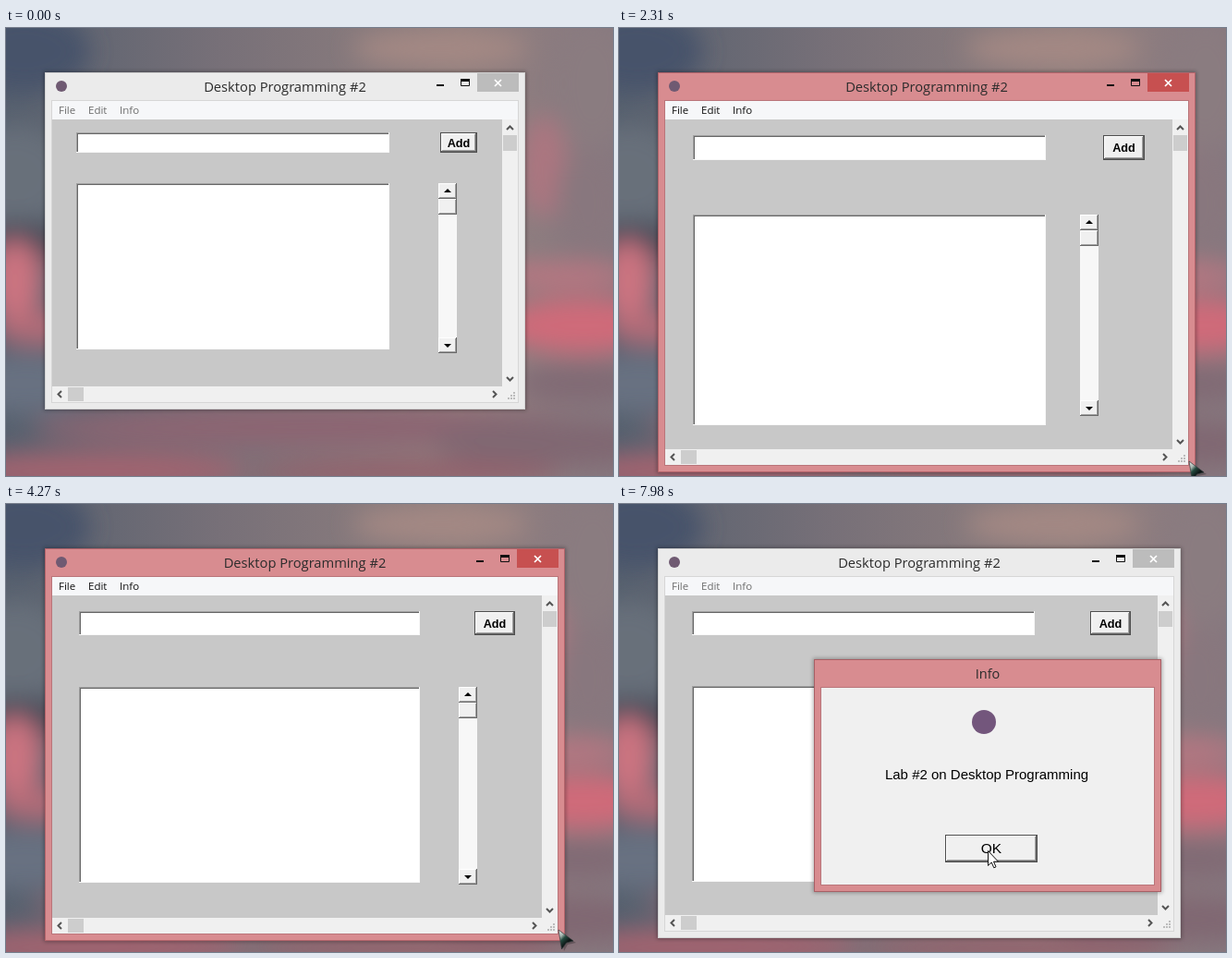
These frames come from a looping animation (657x485 px, 8000 ms). An HTML page:

```html
<!DOCTYPE html>
<html lang="en">
<head>
<meta charset="utf-8">
<title>Resizable window demo</title>
<style>
  html, body { margin: 0; width: 100%; height: 100%; overflow: hidden; background: #7d6c76; }
  svg { display: block; width: 657px; height: 485px; }
  text { font-family: "Open Sans", "Noto Sans", sans-serif; white-space: pre; }
  .plain { font-family: "Liberation Sans", Arial, sans-serif; }
</style>
</head>
<body>
<svg viewBox="0 0 657 485" xmlns="http://www.w3.org/2000/svg">
  <defs>
    <filter id="soft" x="-60%" y="-60%" width="220%" height="220%"><feGaussianBlur stdDeviation="13"/></filter>
    <filter id="glow" x="-10%" y="-10%" width="120%" height="120%"><feGaussianBlur stdDeviation="2"/></filter>
    <linearGradient id="base" x1="0" y1="0" x2="1" y2="0">
      <stop offset="0" stop-color="#56606e"/><stop offset=".35" stop-color="#777078"/>
      <stop offset=".75" stop-color="#92807f"/><stop offset="1" stop-color="#86787f"/>
    </linearGradient>
    <linearGradient id="ink" x1="0" y1="0" x2=".75" y2="1">
      <stop offset="0" stop-color="#f0f4f2"/><stop offset=".28" stop-color="#a9b8b2"/>
      <stop offset=".45" stop-color="#23493e"/><stop offset=".7" stop-color="#0c1414"/>
    </linearGradient>
    <g id="dark">
      <path d="M3 4 6 23 10 16 19 14Z" fill="#000" opacity=".25"/>
      <path d="M0 0 16 12 8.500 14 3.500 21Z" fill="url(#ink)" stroke="#30383a" stroke-width=".7"/>
    </g>
    <path id="white" d="M.5.5V16.500L4.200 13 6.800 18.800 9 17.800 6.500 12.200H11.500Z" fill="#fff" stroke="#111"/>
  </defs>
  <rect width="657" height="485" fill="url(#base)"/>
  <g id="paint" filter="url(#soft)"></g>
  <g id="stage"></g>
</svg>
<script>
const LOOP = 8000, STEP = 70;
const PINK = '#d88c90', FACE = '#f0f0f0', EDGE = '#696969';
const stage = document.getElementById('stage');

// x, y, rx, ry, colour
const blobs = [
  [20, 25, 70, 45, '#46536a'], [10, 160, 60, 55, '#68707a'], [15, 235, 55, 26, '#4b4e5a'],
  [470, 22, 95, 18, '#a58984'], [635, 60, 45, 70, '#8a7b80'], [582, 150, 25, 55, '#ac7680'],
  [630, 190, 35, 60, '#88777e'], [600, 268, 80, 14, '#b97681'], [625, 322, 90, 30, '#cf6a79'],
  [10, 275, 30, 45, '#ca7380'], [35, 325, 50, 18, '#b36c78'], [20, 385, 70, 32, '#687181'],
  [620, 385, 70, 22, '#816b75'], [330, 432, 300, 22, '#8c6572'], [590, 450, 130, 26, '#806772'],
  [90, 480, 170, 22, '#a1636f'], [430, 482, 170, 14, '#93606c']
];
document.getElementById('paint').innerHTML = blobs.map(([x, y, rx, ry, c]) =>
  `<ellipse cx="${x}" cy="${y}" rx="${rx}" ry="${ry}" fill="${c}"/>`).join('');

// time, right edge, bottom edge
const sizeKeys = [
  [1470, 562, 413], [1820, 593, 455], [2310, 624, 481], [2520, 627, 484], [2660, 627, 484],
  [2940, 589, 464], [3430, 551, 415], [3500, 551, 415], [3570, 554, 419],
  [4060, 602, 475], [4200, 602, 475], [4270, 605, 473], [4480, 608, 470]
];
// time, tip x, tip y; the drag in between follows the window corner
const approach = [
  [70, 577, 470], [280, 559, 415], [420, 559, 415], [560, 557, 410], [770, 557, 410],
  [910, 557, 408], [980, 557, 408], [1120, 556, 402], [1190, 556, 402], [1330, 555, 401]
];
const leave = [
  [4760, 601, 458], [4970, 505, 380], [5250, 235, 160], [5460, 143, 93], [5600, 143, 93],
  [5670, 144, 95], [6020, 144, 95], [6230, 168, 109], [7000, 168, 109],
  [7280, 235, 180], [7630, 372, 325], [7840, 399, 365], [7910, 398, 371], [7980, 399, 375]
];

const clamp = v => Math.max(0, Math.min(1, v));

function track(keys, t) {
  const i = keys.findIndex(k => k[0] > t);
  if (i < 0) return keys[keys.length - 1].slice(1);
  if (i === 0) return keys[0].slice(1);
  const a = keys[i - 1], b = keys[i], p = (t - a[0]) / (b[0] - a[0]);
  return [1, 2].map(n => Math.round(a[n] + (b[n] - a[n]) * p));
}

const rect = (x, y, w, h, fill, extra = '') =>
  `<rect x="${x}" y="${y}" width="${w}" height="${h}" fill="${fill}" ${extra}/>`;
const frame = (x, y, w, h, fill, line) =>
  rect(x + .5, y + .5, w - 1, h - 1, fill, `stroke="${line}"`);
const text = (x, y, size, s, fill = '#000', extra = '') =>
  `<text x="${x}" y="${y}" font-size="${size}" fill="${fill}" ${extra}>${s}</text>`;
const stroke = (d, color, width) =>
  `<path d="${d}" fill="none" stroke="${color}" stroke-width="${width}"/>`;
const dot = (x, y, r, fill) => `<circle cx="${x}" cy="${y}" r="${r}" fill="${fill}"/>`;
const middle = 'text-anchor="middle"';

const shadow = (x, y, w, h) =>
  rect(x - 1, y - 1, w + 2, h + 2, '#000', 'opacity=".3" filter="url(#glow)"');

function sunken(x, y, w, h) {
  return rect(x - 1, y - 1, w + 2, h + 2, '#f8f8f8') + rect(x - 1, y - 1, w + 1, h + 1, '#a0a0a0') +
    rect(x, y, w, h, EDGE) + rect(x + 1, y + 1, w - 1, h - 1, '#fff');
}

function raised(x, y, w, h) {
  return rect(x, y, w, h, EDGE) + rect(x, y, w - 1, h - 1, '#fff') +
    rect(x + 1, y + 1, w - 2, h - 2, '#a0a0a0') + rect(x + 1, y + 1, w - 3, h - 3, FACE);
}

const pushButton = (x, y, w, h) => rect(x, y, w, h, '#4e4e4e') + raised(x + 1, y + 1, w - 2, h - 2);

function chevron(x, y, turn) {
  return `<path d="M-3.500 2 0 -1.500 3.500 2" transform="translate(${x} ${y}) rotate(${turn})"
    fill="none" stroke="#555" stroke-width="2"/>`;
}

function windowScrollbars(x, y) {
  let s = rect(x, 99, 17, y - 99, FACE) + rect(50, y, x - 33, 17, FACE);
  s += rect(x + 1, 116, 15, 17, '#cdcdcd') + rect(67, y + 1, 17, 15, '#cdcdcd');
  s += chevron(x + 8.5, 108, 0) + chevron(x + 8.5, y - 8, 180);
  s += chevron(58, y + 8.5, -90) + chevron(x - 8, y + 8.5, 90);
  for (let r = 0; r < 3; r++)
    for (let c = 0; c <= r; c++)
      s += rect(x + 12 - c * 3, y + 6 + r * 3, 2, 2, '#bcbcbc');
  return s;
}

function classicScrollbar(x, y, h) {
  const end = y + h - 17;
  return rect(x, y, 20, h, '#f7f7f7') + raised(x, y, 20, 17) + raised(x, y + 17, 20, 17) + raised(x, end, 20, 17) +
    `<path d="M${x + 6} ${y + 10}h8l-4-4zM${x + 6} ${end + 7}h8l-4 4z"/>`;
}

function controls(w, h) {
  const left = 50 + Math.round(w * .0563), wide = Math.round(w * .6925);
  const top = 99 + Math.round(h * .051), high = Math.round(h * .07);
  const addX = 50 + Math.round(w * .8627), addW = Math.round(w * .0828);
  const mid = 99 + Math.round(h / 2 - 74.5);
  const rows = Math.floor((h / 2 + 46) / 16);
  return sunken(left, top, wide, high) +
    pushButton(addX, top - 1, addW, high + 2) +
    text(addX + addW / 2, top + high / 2 + 4.5, 12.7, 'Add', '#000', middle + ' class="plain" font-weight="700"') +
    sunken(left, mid, wide, rows * 16 + 2) +
    classicScrollbar(50 + Math.round(w / 2 + 174.5), mid - 1, Math.round(h / 2 + 39.5));
}

function mainWindow(R, B, active, infoHot) {
  const ink = active ? '#111' : '#6d6d6d';
  const close = R - 52;
  let s = shadow(42, 48, R - 42, B - 48);
  s += frame(42, 48, R - 42, B - 48, active ? PINK : '#ebebeb', active ? '#b4646b' : '#d2d2d2');
  s += frame(49, 78, R - 56, B - 85, '#c8c8c8', active ? '#b9757a' : '#d6d6d6');
  s += dot(60, 63, 6, '#6f5a72');
  s += text((42 + R) / 2, 69, 14.7, 'Desktop Programming #2', '#2b2b2b', middle);
  s += rect(R - 96, 61, 8, 2, '#111');
  s += stroke(`M${R - 69.5} 56v6.500h9v-6.500`, '#111', 1) + rect(R - 70, 55, 10, 3, '#111');
  s += rect(close, 49, 45, 20, active ? '#c75050' : '#bcbcbc');
  s += stroke(`M${close + 19} 56l7 7m0-7l-7 7`, '#fff', 1.7);
  s += rect(50, 79, R - 58, 20, '#f6f7f9');
  if (infoHot) s += frame(116, 79, 35, 19, '#b5d7f6', '#74b2e8');
  s += text(57, 93, 11.5, 'File', ink) + text(89, 93, 11.5, 'Edit', ink) + text(123, 93, 11.5, 'Info', ink);
  return s + controls(R - 75, B - 124) + windowScrollbars(R - 25, B - 25);
}

function dropdown(opacity, hot) {
  return `<g opacity="${opacity}">` + rect(120, 102, 179, 26, '#000', 'opacity=".55" filter="url(#glow)"') +
    frame(116, 98, 181, 28, FACE, '#979797') +
    (hot ? frame(119, 101, 175, 22, '#b5d7f6', '#74b2e8') : '') +
    text(150, 116, 11.5, 'Info') + text(211, 116, 11.5, 'Ctrl+I') + '</g>';
}

function dialog(p) {
  return `<g opacity="${p}" transform="translate(399 294) scale(${.9 + .1 * p}) translate(-399 -294)">` +
    shadow(211, 168, 376, 252) + frame(211, 168, 376, 252, PINK, '#a95f65') +
    frame(218, 198, 362, 215, FACE, '#b9757a') +
    text(399, 189, 14.5, 'Info', '#2b2b2b', middle) +
    dot(395, 236, 13, '#73567c') +
    text(398, 298, 15, 'Lab #2 on Desktop Programming', '#000', middle + ' class="plain"') +
    pushButton(353, 358, 100, 30) +
    text(403, 378, 15.5, 'OK', '#000', middle + ' class="plain"') + '</g>';
}

function pointer(t, R, B) {
  if (t < 70) return '';
  const [x, y] = t < 1400 ? track(approach, t) : t < 4760 ? [R - 7, B - 12] : track(leave, t);
  const shape = t > 7000 && x > 218 && y > 198 ? 'white' : 'dark';
  return `<use href="#${shape}" x="${x}" y="${y}"/>`;
}

function render(t) {
  const [R, B] = track(sizeKeys, t);
  let s = mainWindow(R, B, t >= 1540 && t < 6510, t >= 5390 && t < 6510);
  if (t >= 5810 && t < 6510) s += dropdown(Math.min(1, .5 + (t - 5810) / 280), t >= 6160);
  if (t > 6510) s += dialog(clamp((t - 6510) / 280));
  stage.innerHTML = s + pointer(t, R, B);
}

const start = performance.now();
let last = -1;
function tick() {
  const t = Math.floor(((performance.now() - start) % LOOP) / STEP) * STEP;
  if (t !== last) render(last = t);
  requestAnimationFrame(tick);
}
tick();
</script>
</body>
</html>
```
